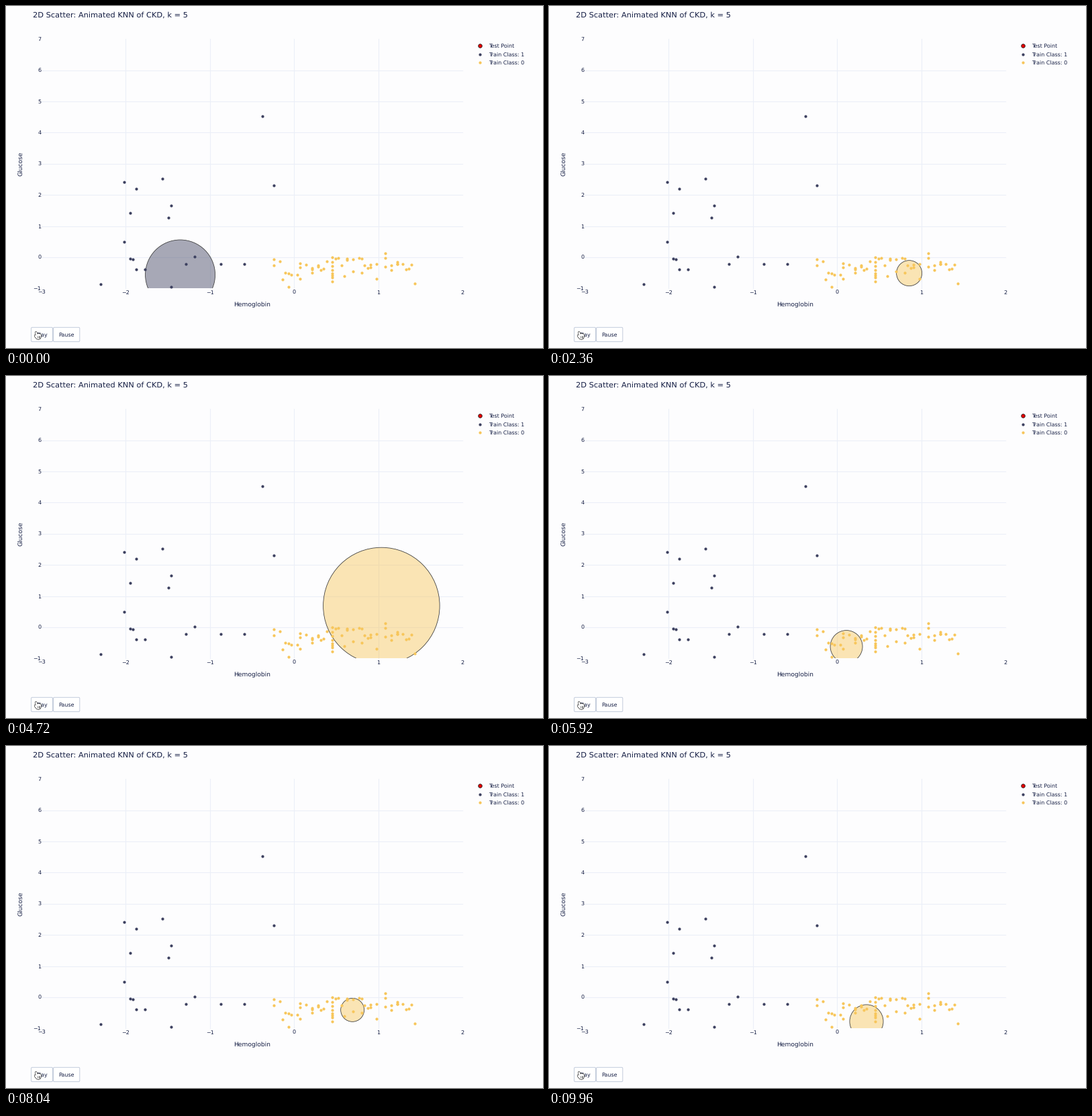
A matplotlib script for the animation above (10000 ms loop, 800 px wide and 509 px high).

```python
import matplotlib.pyplot as plt
import numpy as np
from matplotlib.animation import FuncAnimation
from matplotlib.colors import to_rgb
from matplotlib.patches import Circle, Ellipse, FancyBboxPatch, Rectangle

W, H, DPI = 800, 509, 100
PX = 72 / DPI  # points per pixel
FRAMES, STEP_MS = 250, 40
HOP_MS, LEAD_MS = 510, 50  # one move, and how far the first move has run at start

INK, GRID, PAPER = "#161f45", "#ebeff8", "#fdfdfe"
NAVY, AMBER = "#3d4160", "#f7c65b"
CLASS_EDGE = 380  # circles left of this x belong to class 1

# Key stops of the neighbourhood circle: number -> x, y, radius
KEY_STOPS = {
    0: (258.9, 400, 52.1), 1: (433, 402, 24), 3: (599.8, 393.5, 24),
    4: (488, 394, 19), 5: (541, 398, 19), 7: (560, 401.6, 16.8),
    8: (250, 390, 59), 9: (572, 330, 101), 10: (500, 398, 20),
    12: (440, 402.8, 24.2), 13: (320, 378, 63), 15: (404, 378, 35),
    16: (517.3, 393, 17.3), 18: (445, 388, 27), 20: (476.2, 412.5, 24.8),
}

# Samples of class 1 lie far apart
SICK = [
    (382, 164), (399, 267), (176, 262), (194, 272), (233, 257), (185, 308),
    (246, 297), (242, 315), (176, 351), (185, 376), (189, 377), (194, 392),
    (207, 392), (141, 414), (246, 418), (268, 384), (281, 373), (320, 384),
    (355, 384),
]

plt.rcParams["font.family"] = "DejaVu Sans"
plt.rcParams["text.hinting"] = "none"

fig = plt.figure(figsize=(W / DPI, H / DPI), dpi=DPI, facecolor=PAPER)
ax = fig.add_axes([0, 0, 1, 1])
ax.set_xlim(0, W)
ax.set_ylim(H, 0)
ax.axis("off")


def x_px(value):
    return 429.1 + 125.4 * value


def y_px(value):
    return 374 - 46.4 * value


def healthy_samples():
    """A dense band on a fixed x lattice, with one upright stack."""
    rng = np.random.default_rng(5)
    column = np.round(np.linspace(0, 48, 53) + rng.normal(0, 0.6, 53)).clip(0, 48)
    x = 399 + 4.37 * column
    y = rng.normal(390, 12, 53).clip(368, 418)
    stack = [(486.4, y) for y in np.linspace(381, 410, 6)]
    return list(zip(x, y)) + stack


def label(x, y, text, size=8.0, **kw):
    """Text with its baseline at y; size in pixels."""
    return ax.text(x, y, text, fontsize=size * PX, color=INK, va="baseline", **kw)


def dots(points, color, diameter=4.2, **kw):
    xs, ys = zip(*points)
    kw.setdefault("linewidths", 0)
    ax.scatter(xs, ys, s=(diameter * PX) ** 2, c=color, zorder=4, **kw)


def tick_text(value):
    return str(value).replace("-", "\u2212")


def draw_axes():
    left, right, top, bottom = x_px(-3), x_px(2), y_px(7), y_px(-1)
    for v in range(-3, 3):
        if -3 < v < 2:
            ax.plot([x_px(v)] * 2, [top, bottom], color=GRID, lw=1.1 * PX, zorder=1)
        label(x_px(v) + 0.2, 429.2, tick_text(v), ha="center")
    for v in range(-1, 8):
        if -1 < v < 7:
            ax.plot([left, right], [y_px(v)] * 2, color=GRID, lw=1.1 * PX, zorder=1)
        label(52.3, y_px(v) + 3, tick_text(v), ha="right")
    label(366.5, 447, "Hemoglobin", 9.1, ha="center")
    label(24.8, 235, "Glucose", 9.1, ha="center", rotation=90, rotation_mode="anchor")
    label(40, 17.2, "2D Scatter: Animated KNN of CKD, k = 5", 11.38)
    return Rectangle((left, top), right - left, bottom - top, transform=ax.transData)


def draw_legend():
    rows = [("Test Point", "#e60000", 5.6), ("Train Class: 1", NAVY, 4.2),
            ("Train Class: 0", AMBER, 4.2)]
    for i, (text, color, size) in enumerate(rows):
        y = 59 + 12.5 * i
        edge = {"edgecolors": "#222222", "linewidths": 0.8 * PX} if i == 0 else {}
        dots([(705.6, y)], color, size, **edge)
        label(719, y + 3.2, text)


def draw_buttons():
    for x, w, text in [(37.5, 32, "Play"), (70.5, 39.3, "Pause")]:
        ax.add_patch(FancyBboxPatch(
            (x, 478.3), w, 21.3, boxstyle="round,pad=0,rounding_size=1.5",
            fc="white", ec="#bec8d9", lw=0.9 * PX, zorder=2))
        label(x + w / 2, 491.4, text, ha="center", zorder=3)


def draw_hand():
    """Pointing hand: a tilted index finger, a thumb, knuckles and a palm."""
    parts = [((45.4, 488.4), 2.6, 8, -15), ((44.4, 491.8), 2.6, 5, -40)]
    parts += [((48 + 1.5 * i, 489.8 + 0.4 * i), 2.4, 5, 0) for i in range(3)]
    parts.append(((48.2, 492.8), 7.4, 6.6, 0))
    for grow, color, z in [(1.2, "#151515", 6), (0, "white", 7)]:
        for center, w, h, angle in parts:
            ax.add_patch(Ellipse(center, w + grow, h + grow, angle=angle,
                                 fc=color, lw=0, zorder=z))
    for i in range(3):
        ax.plot([47 + 1.6 * i] * 2, [491.2, 494], color="#333333", lw=0.6 * PX, zorder=8)


plot_area = draw_axes()
draw_legend()
draw_buttons()
draw_hand()
dots(SICK, NAVY)
dots(healthy_samples(), AMBER)

fill = Circle((0, 0), 1, lw=0, alpha=0.45, zorder=2)
ring = Circle((0, 0), 1, fill=False, ec="#3a3a3a", lw=0.8 * PX, zorder=3)
for patch in (fill, ring):
    ax.add_patch(patch)
    patch.set_clip_path(plot_area)

# Stops without a key lie evenly between their neighbours
keys = np.array(list(KEY_STOPS.values()))
order = np.arange(max(KEY_STOPS) + 1)
stops = np.column_stack([np.interp(order, list(KEY_STOPS), c) for c in keys.T])
stop_rgb = np.array([to_rgb(NAVY if x < CLASS_EDGE else AMBER) for x in stops[:, 0]])


def ease(p):
    """Cubic in and out."""
    return 4 * p ** 3 if p < 0.5 else 1 - 4 * (1 - p) ** 3


def update(frame):
    hop, p = divmod((frame * STEP_MS + LEAD_MS) / HOP_MS, 1)
    i, mix = int(hop), ease(p)
    x, y, r = stops[i] + (stops[i + 1] - stops[i]) * mix
    for patch in (fill, ring):
        patch.set_center((x, y))
        patch.set_radius(r)
    fill.set_facecolor(stop_rgb[i] + (stop_rgb[i + 1] - stop_rgb[i]) * mix)
    return fill, ring


anim = FuncAnimation(fig, update, frames=FRAMES, interval=STEP_MS,
                     repeat=True, repeat_delay=0)
plt.show()
```
